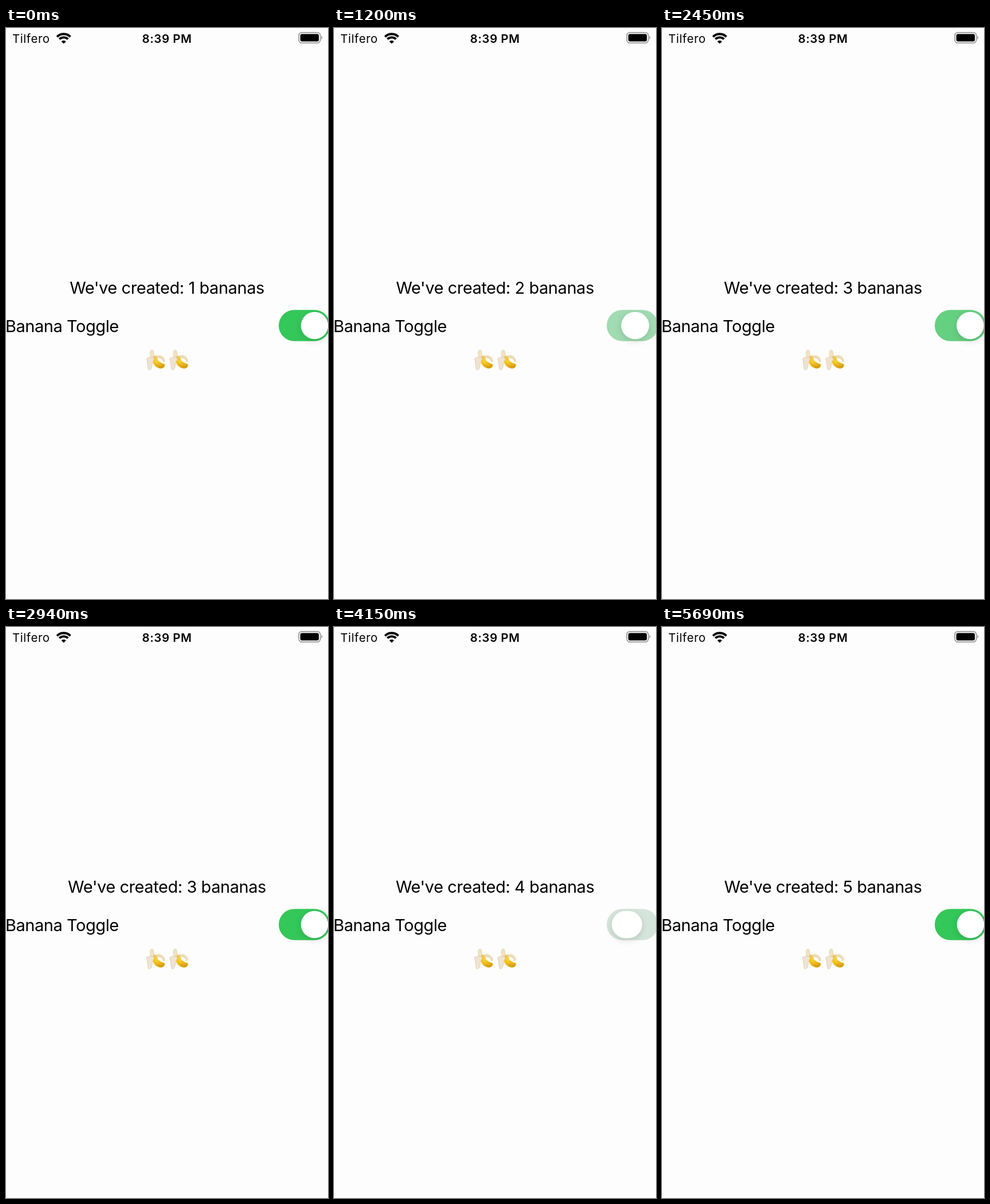
Recreate the animation shown at these times as an HTML page. Size 562x997 px, loop 5740 ms.

```html
<!DOCTYPE html>
<html lang="en">
<head>
<meta charset="utf-8">
<title>Banana Toggle</title>
<style>
  html, body { margin: 0; width: 100%; height: 100%; overflow: hidden; background: #fdfdfd; }
  svg { display: block; width: 100vw; height: 100vh; }
  text { font-family: Inter, Roboto, "Liberation Sans", sans-serif; fill: #000; }
  .body { font-size: 28.9px; letter-spacing: -.0135em; }
  .status { font-size: 20.4px; letter-spacing: .6px; }
  #knob { fill: #fff; filter: drop-shadow(0 4px 6px rgba(0, 0, 0, .12)); }
</style>
</head>
<body>
<svg viewBox="0 0 562 997">
  <defs>
    <linearGradient id="skin" x1="0" y1="0" x2=".5" y2="1">
      <stop offset="0" stop-color="#eebf3c"/>
      <stop offset=".5" stop-color="#fbd02c"/>
      <stop offset="1" stop-color="#dca012"/>
    </linearGradient>
    <g id="banana" stroke-width=".7">
      <path fill="#f0e2c3" stroke="#dccaa3" d="M8 2C10 0 12 1 12.5 5L14 13L8 14C6 9 6 4 8 2Z"/>
      <path fill="url(#skin)" d="M10 17C11 11 19 10 21 13C17 17 20 22 32 26C33 31 29 34 24 33.5C16 32 10 26 10 17Z"/>
      <path fill="#f0dfbd" stroke="#dcc08a" d="M16 13C22 9 30 11 32 20C31 23 29 22 29 20C27 15 22 14 17 15Z"/>
      <path fill="#efe4d2" stroke="#d3c2a5" d="M11 14C5 13 0 15 0 18C3 20 1 30 4 36C8 36 9.5 33 10 28C10 23 13 19 14 16Z"/>
      <path fill="none" stroke="#c98f10" d="M13 21C16 27 22 31 29 31"/>
    </g>
  </defs>

  <text class="status" x="11" y="25.5">Tilfero</text>
  <g fill="none" stroke="#000" stroke-width="3.8">
    <path d="M89.03 15.33A16.5 16.5 0 0 1 112.37 15.33"/>
    <path d="M93.2 19.5A10.6 10.6 0 0 1 108.2 19.5"/>
  </g>
  <path d="M100.7 27.6L96.6 23.4A5.9 5.9 0 0 1 104.8 23.4Z"/>
  <text class="status" x="281" y="25.5" text-anchor="middle" font-weight="600">8:39 PM</text>
  <rect x="511" y="7.8" width="37.6" height="18.4" rx="5.5" fill="none" stroke="#999" stroke-width="1.7"/>
  <rect x="513.6" y="10.4" width="32.4" height="13.2" rx="3"/>
  <path fill="#999" d="M550.3 13.8C552.7 14.8 552.7 19.2 550.3 20.2Z"/>

  <g id="panel">
    <text id="label" class="body" x="281" y="463.7" text-anchor="middle"></text>
    <text class="body" x="-1" y="530.5">Banana Toggle</text>
    <rect id="track" x="476" y="492.3" width="89.5" height="54.4" rx="27.2"/>
    <rect id="knob" y="495.7" height="47.6" rx="23.8"/>
  </g>
  <g id="bananas">
    <use href="#banana" x="245" y="561"/>
    <use href="#banana" x="285.5" y="561"/>
  </g>
</svg>
<script>
  const LOOP = 5740, STEP = 50, PRESS = 140;
  const GREEN = [52, 199, 89], GRAY = [232, 232, 234];
  // time of each tap, new state, counter
  const TAPS = [
    [-1000, 1, 1], [390, 0, 1], [1050, 1, 2], [1680, 0, 2], [2220, 1, 3],
    [3411, 0, 3], [4080, 1, 4], [4763, 0, 4], [5340, 1, 5]
  ];

  const $ = id => document.getElementById(id);
  const clamp = v => Math.min(1, Math.max(0, v));
  const smooth = v => { v = clamp(v); return v * v * (3 - 2 * v); };
  const mix = (a, b, k) => a + (b - a) * k;

  function draw(t) {
    let i = TAPS.length - 1;
    while (TAPS[i][0] > t) i--;
    const [start, on, count] = TAPS[i];
    const age = t - start;
    const next = TAPS[i + 1];

    // the knob widens towards the middle while it is held
    const press = next ? smooth((t - next[0] + PRESS) / 80) : 0;
    const stretch = Math.max(press, 1 - smooth(age / 200));
    const moved = smooth(age / 250);
    const place = on ? moved : 1 - moved;
    const center = mix(503, 538.5, place) + stretch * mix(4, -6, place);
    const width = 47.6 + 7.4 * stretch;
    $('knob').setAttribute('width', width);
    $('knob').setAttribute('x', center - width / 2);

    const tint = on ? smooth(age / 350) : (1 - clamp(age / 150)) ** 1.8;
    const color = GRAY.map((c, n) => Math.round(mix(c, GREEN[n], tint)));
    $('track').setAttribute('fill', `rgb(${color})`);

    $('label').textContent = `We've created: ${count} bananas`;
    $('panel').setAttribute('transform', `translate(0 ${on ? 0 : 25})`);
    $('bananas').style.display = on ? '' : 'none';
  }

  const origin = performance.now();
  function tick() {
    const t = (performance.now() - origin) % LOOP;
    draw(Math.floor((t + 10) / STEP) * STEP);
    requestAnimationFrame(tick);
  }
  tick();
</script>
</body>
</html>
```
